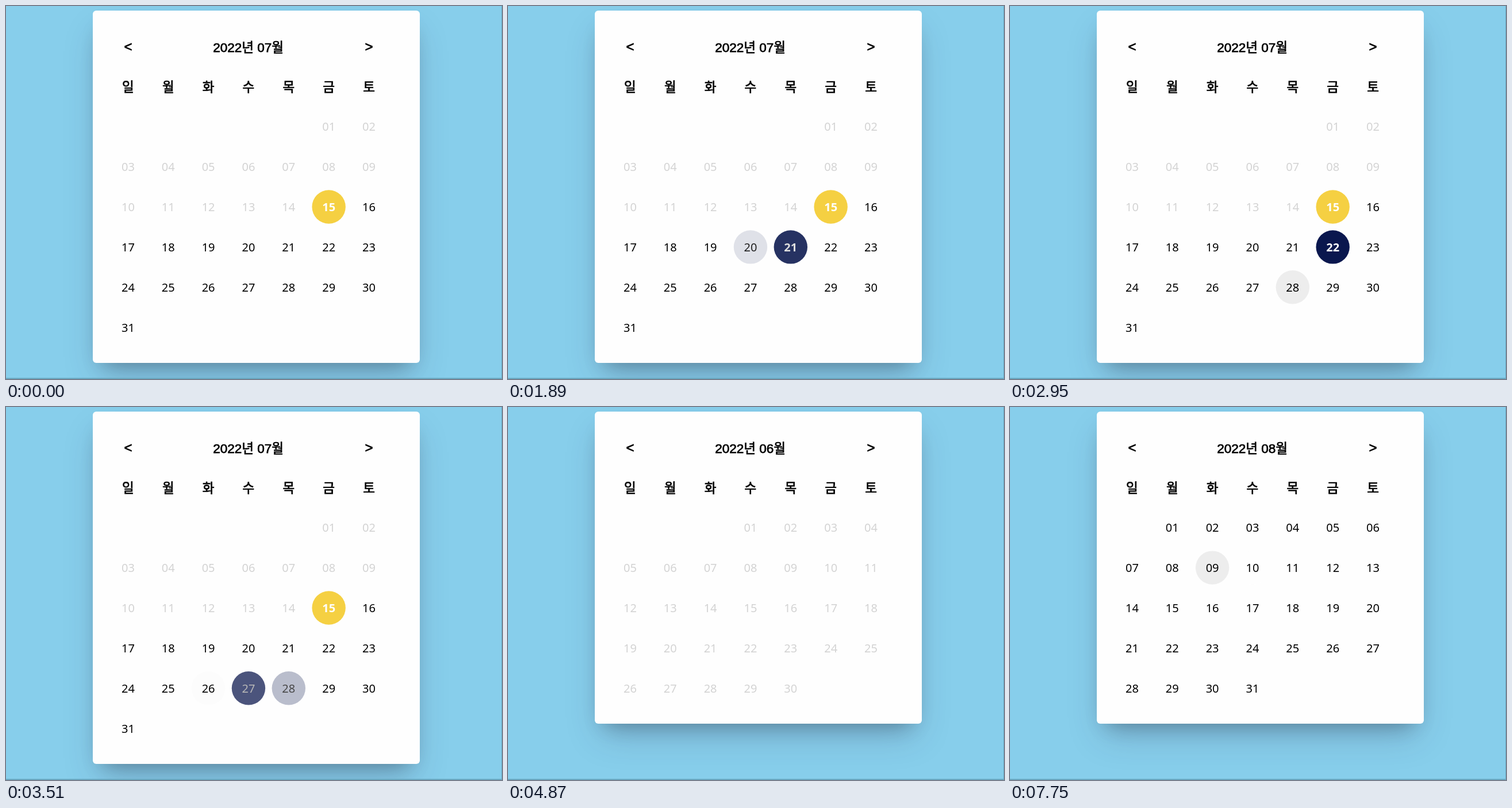
Animation, 863 px wide and 649 px high, one loop 8.69 s. Source, as an HTML page with a canvas:

```html
<!DOCTYPE html>
<html lang="ko">
<head>
<meta charset="utf-8">
<title>달력</title>
<style>
  html, body { margin: 0; width: 100%; height: 100%; overflow: hidden; background: #87ceeb; }
  canvas { display: block; }
</style>
</head>
<body>
<canvas id="stage" width="863" height="649"></canvas>
<script>
const ctx = document.getElementById('stage').getContext('2d');
const LOOP = 8690;
const FADE = 200;
const SKY = '#87ceeb', EDGE = '#69a8c1', CARD = '#fefefe', MUTED = '#d3d3d3';
const WHITE = [254, 254, 254], BLACK = [0, 0, 0], GREY = [237, 237, 237];
const NAVY = [10, 23, 78], YELLOW = [245, 208, 66];
const WEEKDAYS = [...'일월화수목금토'];

// Pointer positions and clicks as [time, day]; day 0 means no day.
const julyHovers = [
  [20, 26], [160, 25], [290, 18], [840, 19], [1230, 20], [1600, 21], [1990, 15],
  [2380, 22], [2740, 28], [3240, 27], [3490, 26], [3930, 19], [4100, 0]
];
const julyClicks = [
  [634, 18], [1034, 19], [1400, 20], [1774, 21], [2140, 15],
  [2510, 22], [3060, 28], [3426, 27], [3825, 26]
];
const augustHovers = [[6590, 5], [6690, 0], [6890, 11], [7250, 10], [7570, 9]];

const june = { name: '06', offset: 3, days: 30, firstOpen: 31, hovers: [], clicks: [] };
const july = { name: '07', offset: 5, days: 31, firstOpen: 15, today: 15, hovers: julyHovers, clicks: julyClicks };
const august = { name: '08', offset: 1, days: 31, firstOpen: 1, hovers: augustHovers, clicks: [] };
const freshJuly = { ...july, hovers: [], clicks: [] };
const pages = [[0, july], [4870, june], [5690, freshJuly], [6170, august]];

const columnX = i => 212.4 + 69.85 * i;
const rowY = i => 139.9 + 69.9 * i;

// CSS "ease": cubic-bezier(.25, .1, .25, 1)
function ease(x) {
  if (x <= 0) return 0;
  if (x >= 1) return 1;
  const bezier = (a, b, u) => 3 * a * u * (1 - u) ** 2 + 3 * b * u * u * (1 - u) + u ** 3;
  let low = 0, high = 1;
  for (let i = 0; i < 20; i++) {
    const mid = (low + high) / 2;
    if (bezier(0.25, 0.25, mid) < x) low = mid; else high = mid;
  }
  return bezier(0.1, 1, low);
}

const lerp = (a, b, p) => a + (b - a) * p;
const mix = (a, b, p) => a.map((v, i) => lerp(v, b[i], p));
const rgb = c => `rgb(${c.map(Math.round).join(',')})`;

// How far a day has faded towards being hovered or selected.
function level(events, day, time) {
  let from = 0, target = 0, start = -FADE;
  const at = t => lerp(from, target, ease((t - start) / FADE));
  for (const [when, who] of events) {
    if (when > time) break;
    const next = Number(who === day);
    if (next === target) continue;
    from = at(when);
    target = next;
    start = when;
  }
  return at(time);
}

function roundRect(x, y, w, h, r) {
  ctx.beginPath();
  ctx.roundRect(x, y, w, h, r);
  ctx.fill();
}

function drawCard(height) {
  const x = 151, y = 8, width = 569, away = 2000;
  const shadow = (color, dy, blur, inset) => {
    ctx.save();
    ctx.shadowColor = color;
    ctx.shadowBlur = blur;
    ctx.shadowOffsetX = away;
    ctx.shadowOffsetY = dy;
    ctx.fillStyle = '#000';
    roundRect(x + inset - away, y + inset, width - 2 * inset, height - 2 * inset, 2);
    ctx.restore();
  };
  shadow('rgba(50,50,93,.25)', 30, 60, 12);
  shadow('rgba(0,0,0,.3)', 18, 36, 18);
  ctx.fillStyle = CARD;
  roundRect(x, y, width, height, 6);
}

function heading(text, x, y, size = 22.5) {
  ctx.font = `${size}px "Liberation Sans", "Noto Sans CJK KR", "Noto Sans CJK", sans-serif`;
  ctx.fillStyle = ctx.strokeStyle = '#000';
  ctx.lineWidth = 0.75;
  ctx.fillText(text, x, y);
  ctx.strokeText(text, x, y);
}

function drawDay(page, day, time) {
  const slot = page.offset + day - 1;
  const x = columnX(slot % 7), y = rowY(1 + Math.floor(slot / 7));
  const isToday = day === page.today;
  const open = day >= page.firstOpen;
  const hover = open && !isToday ? level(page.hovers, day, time) : 0;
  const selected = open ? level(page.clicks, day, time) : 0;

  if (isToday || hover > 0 || selected > 0) {
    const base = isToday ? YELLOW : mix(WHITE, GREY, hover);
    ctx.fillStyle = rgb(mix(base, NAVY, selected));
    ctx.beginPath();
    ctx.arc(x, y - 0.1, 29.2, 0, 2 * Math.PI);
    ctx.fill();
  }
  const bold = isToday || selected > 0.75;
  ctx.font = `${bold ? 700 : 400} 20px "Noto Sans", "Open Sans", sans-serif`;
  ctx.fillStyle = open ? rgb(isToday ? WHITE : mix(BLACK, WHITE, selected)) : MUTED;
  ctx.fillText(String(day).padStart(2, '0'), x, y + 7.5);
}

function draw(time) {
  const page = pages.filter(([start]) => start <= time).pop()[1];
  const rows = Math.ceil((page.offset + page.days) / 7);

  ctx.fillStyle = SKY;
  ctx.fillRect(0, 0, 863, 649);
  drawCard(193.5 + 69.9 * rows);
  ctx.fillStyle = EDGE;
  ctx.fillRect(0, 647, 863, 2);
  ctx.fillRect(862, 0, 1, 649);

  ctx.textAlign = 'center';
  heading('<', columnX(0), 79, 24);
  heading(`2022년 ${page.name}월`, 421.6, 80);
  heading('>', columnX(6), 79, 24);
  WEEKDAYS.forEach((name, i) => heading(name, columnX(i), 148.5));
  for (let day = 1; day <= page.days; day++) drawDay(page, day, time);
}

const origin = performance.now();
function tick() {
  draw((performance.now() - origin) % LOOP);
  requestAnimationFrame(tick);
}
tick();
</script>
</body>
</html>
```
